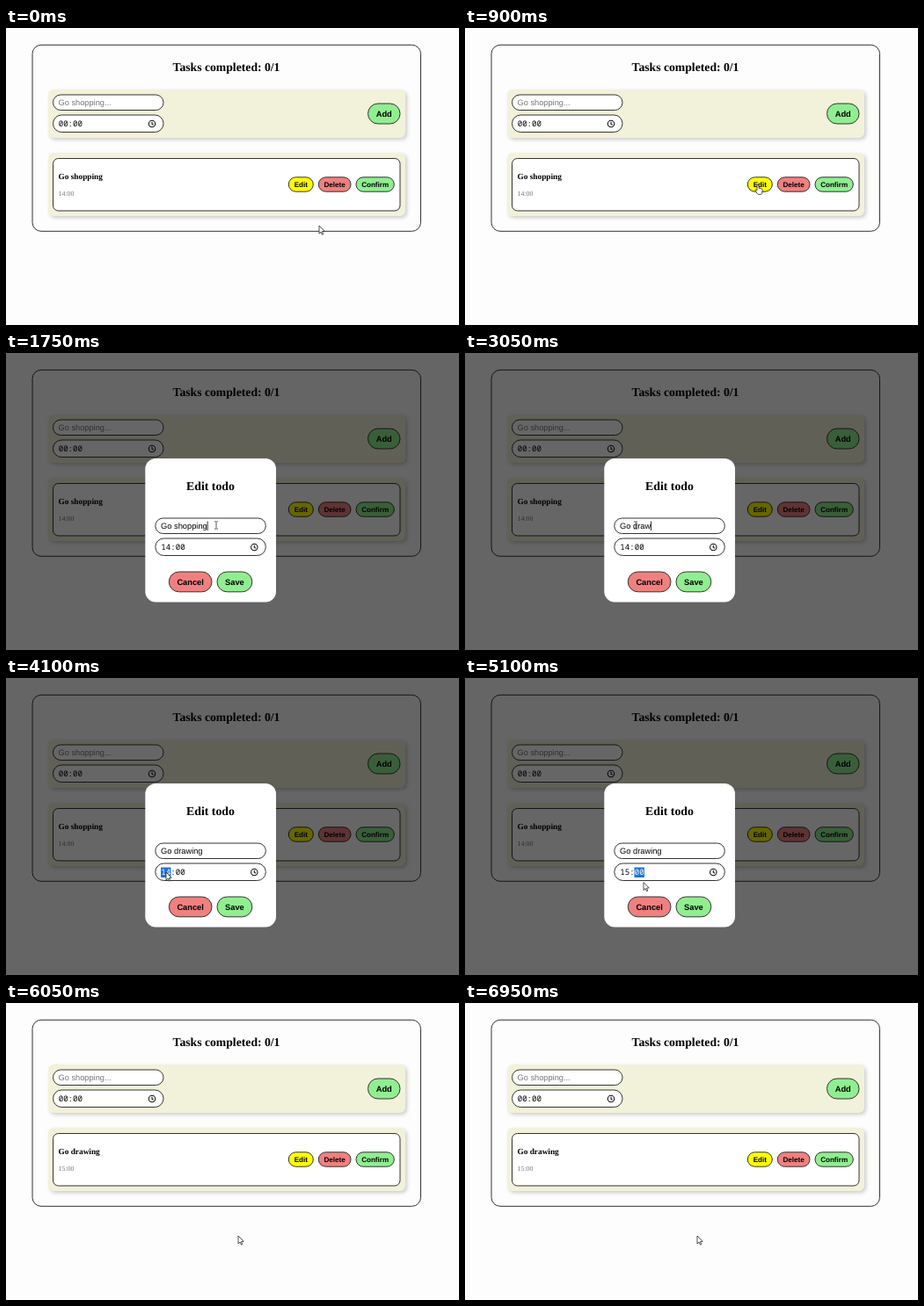
Write an HTML page that moves like this. It is 515 by 338 pixels and loops after 7 s.

```html
<!DOCTYPE html>
<html lang="en">
<head>
<meta charset="utf-8">
<title>Todo list</title>
<style>
html, body { margin: 0; width: 100%; height: 100%; overflow: hidden; background: #fefdfe; }
svg { display: block; width: 515px; height: 338px; }
text { white-space: pre; text-rendering: geometricPrecision; }
.serif { font-family: "Liberation Serif", serif; }
.sans { font-family: "Liberation Sans", sans-serif; }
.mono { font-family: "Noto Sans Mono", monospace; font-weight: 500; }
.bold { font-weight: bold; }
.mid { text-anchor: middle; }
.shadow { filter: drop-shadow(2px 2px 2px rgba(0, 0, 0, .2)); }
</style>
</head>
<body>
<svg id="stage" viewBox="0 0 515 338"></svg>
<script>
const $ = id => document.getElementById(id);
const LOOP = 7000, OPEN = 1050, CLOSE = 6030;
const GREEN = '#90ee90', RED = '#f08080', BLUE = '#1a73d9';

const box = (x, y, w, h, r, fill, extra = 'stroke="#333"') =>
  `<rect x="${x}" y="${y}" width="${w}" height="${h}" rx="${r}" fill="${fill}" ${extra}/>`;
const text = (x, y, size, cls, str, extra = '') =>
  `<text x="${x}" y="${y}" font-size="${size}" class="${cls}" ${extra}>${str}</text>`;
const button = (x, y, w, h, size, label, fill) =>
  box(x, y, w, h, h / 2, fill) +
  text(x + w / 2, y + h / 2 + size * .35, size, 'sans bold mid', label);
const panel = (y, h) => box(48, y, 406, h, 6, '#f2f2da', 'class="shadow"');
const clock = (x, y) =>
  `<g fill="none" stroke="#111" stroke-width="1.1"><circle cx="${x}" cy="${y}" r="3.7"/>` +
  `<path d="M${x} ${y - 2.3}v2.5l1.7 1"/></g>`;
const fields = (x, y) =>
  box(x, y, 125.5, 17.5, 8.7, '#fff') + box(x, y + 23, 125.5, 19.5, 9.7, '#fff') +
  clock(x + 112.5, y + 33);

const cursors = {
  arrow: '<path d="M0 0v9l2.1-1.9 1.4 3.1 1.3-.6-1.4-3 2.8-.2z" fill="#fff" stroke="#222" stroke-width=".8"/>',
  hand: '<path d="M-1 .8q1-1.6 2 0v3.4l3.4.9q1 .4.8 1.7l-.7 3.6q-.2 1-1.2 1h-2.6q-.8 0-1.3-.8l-2.5-3.6q-.1-1.2 1-.9l1.1.8z" fill="#fff" stroke="#222" stroke-width=".8"/>',
  beam: '<path d="M-2-4.2h1.5l.5.5.5-.5h1.5M0-3.7v7.4M-2 4.2h1.5l.5-.5.5.5h1.5" fill="none" stroke="#333" stroke-width=".8"/>'
};

$('stage').innerHTML =
  box(30, 19.3, 441.5, 212, 10, '#fefdfe') +
  text(250.5, 49, 13.7, 'serif bold mid', 'Tasks completed: 0/1') +
  panel(70, 55) + fields(53.5, 76) +
  text(59.5, 87.8, 9.25, 'sans', 'Go shopping...', 'fill="#757575"') +
  text(59.7, 112.3, 9.1, 'mono', '00:00') +
  button(411.5, 86, 36.5, 23, 9.3, 'Add', GREEN) +
  panel(142, 72) + box(53.5, 148.5, 394.5, 59.5, 6, '#fff') +
  text(59.5, 172.3, 9.3, 'serif bold', '', 'id="task"') +
  text(59.5, 191, 7.9, 'serif', '', 'id="due" fill="#777"') +
  button(321.3, 169.8, 28, 16.4, 8.1, 'Edit', '#ffff00') +
  button(355.3, 169.8, 36.7, 16.4, 8.1, 'Delete', RED) +
  button(398, 169.8, 43.3, 16.4, 8.1, 'Confirm', GREEN) +
  '<g id="modal">' +
    box(0, 0, 515, 338, 0, '#000', 'opacity=".6"') +
    box(158.3, 120, 148.7, 163.5, 12, '#fff', '') +
    text(232.5, 156, 13.8, 'serif bold mid', 'Edit todo') +
    fields(169.8, 188) +
    box(0, 191.5, 0, 11, 0, BLUE, 'id="mark"') +
    text(176, 199.8, 9.3, 'sans', '<tspan></tspan><tspan fill="#fff"></tspan>', 'id="name"') +
    box(0, 191.5, .8, 10.5, 0, '#000', 'id="caret"') +
    box(0, 215.5, 11.4, 11.5, 0, BLUE, 'id="part"') +
    text(176.3, 224.3, 9.1, 'mono', '<tspan></tspan><tspan>:</tspan><tspan>00</tspan>', 'id="time"') +
    button(185.3, 249, 48.7, 22.8, 9.3, 'Cancel', RED) +
    button(240, 249, 39.8, 22.8, 9.3, 'Save', GREEN) +
  '</g><g id="cursor"></g>';

// Pointer stops: time, x, y
const path = [
  [0, 356, 225], [150, 356, 225], [750, 333, 178], [1150, 333, 178],
  [1600, 239, 196], [1850, 239, 196], [2350, 194, 196], [3600, 194, 196],
  [4000, 182, 221], [4850, 182, 221], [5080, 203, 232.5], [5200, 203, 232.5],
  [5650, 264, 265], [LOOP, 264, 265]
];
const keys = [2580, 2700, 2840, 2980, 3180, 3320, 3460];

function pointer(t) {
  const i = path.findIndex(p => p[0] > t);
  const [t0, x0, y0] = path[i - 1], [t1, x1, y1] = path[i];
  const u = (t - t0) / (t1 - t0), e = u * u * (3 - 2 * u);
  return [x0 + (x1 - x0) * e, y0 + (y1 - y0) * e];
}

function cursorKind(x, y, open) {
  const over = (l, t, r, b) => x > l && x < r && y > t && y < b;
  if (!open) return over(321, 170, 349, 186) ? 'hand' : 'arrow';
  if (over(170, 188, 295, 206)) return 'beam';
  return over(185, 249, 234, 272) || over(240, 249, 280, 272) ? 'hand' : 'arrow';
}

const show = (id, on) => $(id).setAttribute('visibility', on ? 'inherit' : 'hidden');
const widthOf = n => n > 0 ? $('name').getSubStringLength(0, n) : 0;

function drawName(t, x) {
  const typed = keys.filter(k => k <= t).length;
  const str = typed ? 'Go ' + 'drawing'.slice(0, typed) : 'Go shopping';
  const [plain, picked] = $('name').children;
  plain.textContent = str;
  picked.textContent = '';
  let cut = str.length;
  if (!typed && t > 1850)
    while (cut > 3 && 176 + (widthOf(cut) + widthOf(cut - 1)) / 2 > x) cut--;
  const left = widthOf(cut), right = widthOf(str.length);
  $('mark').setAttribute('x', 176 + left);
  $('mark').setAttribute('width', right - left);
  plain.textContent = str.slice(0, cut);
  picked.textContent = str.slice(cut);
  const since = t - (typed ? keys[typed - 1] : 1650);
  $('caret').setAttribute('x', 176 + right);
  show('mark', cut < str.length);
  show('caret', t > 1650 && t < 4050 && cut === str.length && since % 1000 < 500);
}

function drawTime(t) {
  const [hour, , minute] = $('time').children;
  const onHour = t >= 4050 && t < 4650, onMinute = t >= 4650 && t < 5850;
  hour.textContent = t < 4400 ? '14' : t < 4650 ? '01' : '15';
  hour.setAttribute('fill', onHour ? '#fff' : '#000');
  minute.setAttribute('fill', onMinute ? '#fff' : '#000');
  $('part').setAttribute('x', onHour ? 176 : 192.5);
  show('part', onHour || onMinute);
}

function draw() {
  const t = performance.now() % LOOP;
  const open = t >= OPEN && t < CLOSE, saved = t >= CLOSE;
  const [x, y] = pointer(t);
  $('task').textContent = saved ? 'Go drawing' : 'Go shopping';
  $('due').textContent = saved ? '15:00' : '14:00';
  show('modal', open);
  if (open) {
    drawName(t, x);
    drawTime(t);
  }
  $('cursor').innerHTML = cursors[cursorKind(x, y, open)];
  $('cursor').setAttribute('transform', `translate(${x} ${y})`);
  requestAnimationFrame(draw);
}
draw();
</script>
</body>
</html>
```
